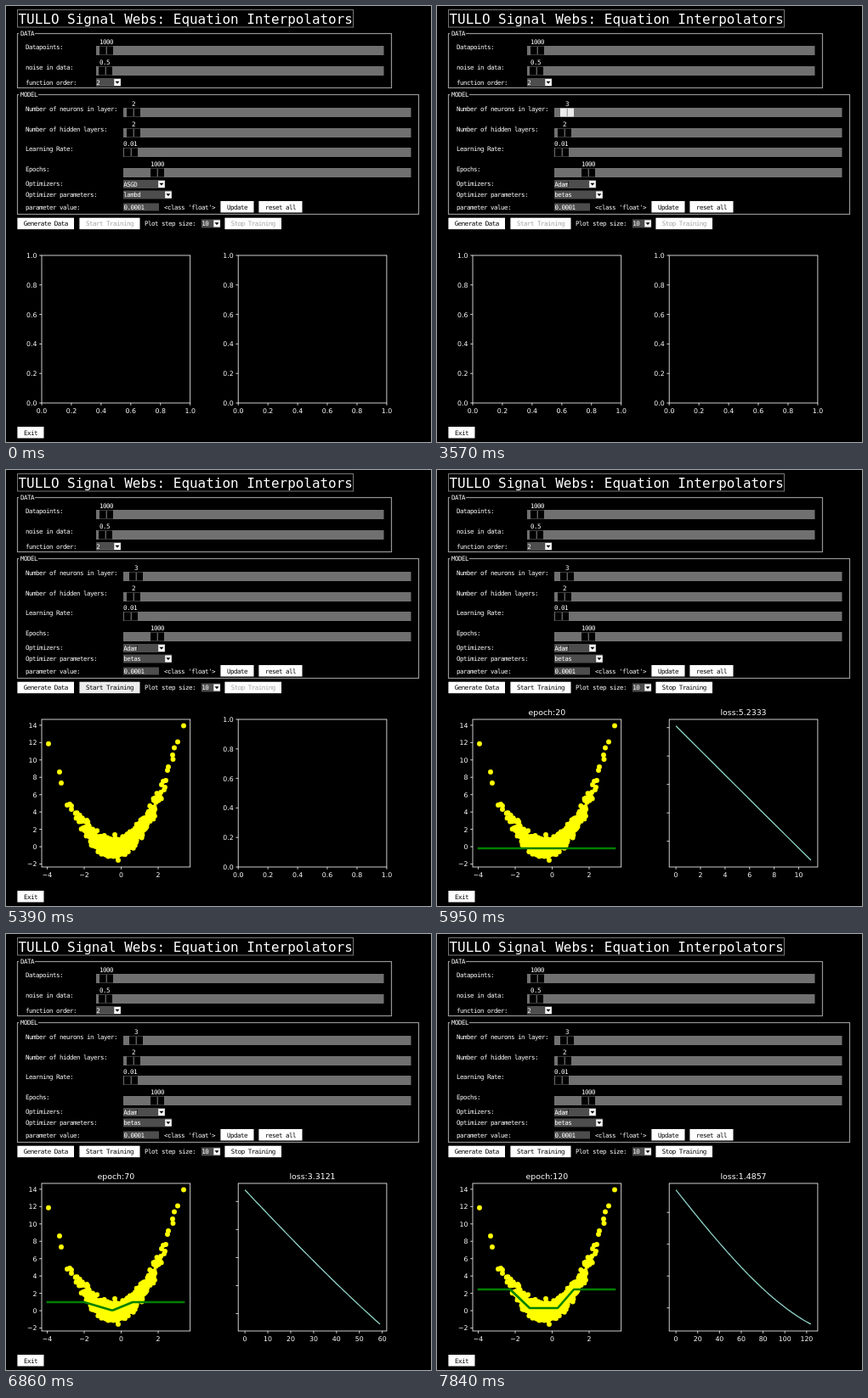
Recreate the animation shown at these times as an HTML page. Size 500x514 px, loop 8 s.

```html
<!DOCTYPE html>
<html lang="en">
<head>
<meta charset="utf-8">
<title>Function fitting demo</title>
<style>
  html, body { margin: 0; width: 100%; height: 100%; overflow: hidden; background: #000; }
  svg { display: block; width: 500px; height: 514px; }
  text { fill: #fff; white-space: pre; }
  .ui { font: 7.5px "DejaVu Sans Mono", "Noto Sans Mono", monospace; letter-spacing: -0.52px; }
  .heading { font: 15.95px "DejaVu Sans Mono", "Noto Sans Mono", monospace; }
  .tick { font: 7.8px "DejaVu Sans", sans-serif; }
  .title { font: 9.4px "DejaVu Sans", sans-serif; }
</style>
</head>
<body>
<svg id="stage" viewBox="0 0 500 514" xmlns="http://www.w3.org/2000/svg"></svg>
<script>
const LOOP = 8000;
const INPUT = '#4d4d4d', TROUGH = '#707070', ACTIVE = '#ececec', DISABLED = '#a3a3a3';
const stage = document.getElementById('stage');

function add(tag, attrs, parent = stage, content) {
  const el = document.createElementNS('http://www.w3.org/2000/svg', tag);
  for (const key in attrs) el.setAttribute(key, attrs[key]);
  if (content !== undefined) el.textContent = content;
  parent.appendChild(el);
  return el;
}
const rect = (x, y, width, height, fill, extra = {}, parent) =>
  add('rect', { x, y, width, height, fill, ...extra }, parent);
const label = (x, y, content, cls = 'ui', anchor = 'start', parent) =>
  add('text', { x, y, class: cls, 'text-anchor': anchor }, parent, content);
const set = (el, key, value) => {
  if (el.getAttribute(key) !== String(value)) el.setAttribute(key, value);
};
const setText = (el, value) => { if (el.textContent !== value) el.textContent = value; };
const show = (el, on) => set(el, 'visibility', on ? 'visible' : 'hidden');

// ---- Widgets ----
function groupBox(x, y, w, h, name) {
  rect(x + .5, y + .5, w, h, 'none', { stroke: '#959595', 'stroke-width': 1.2 });
  rect(x + 2, y - 3, name.length * 4 + 3, 7, '#000');
  label(x + 4, y + 3, name);
}

function slider(x, y, name, nameX, value, center, textX = center) {
  label(nameX, y + 4, name);
  rect(x, y, 338.5, 11, TROUGH);
  const knob = add('g', {});
  const face = rect(-8, y + .5, 16, 10, '#000', {}, knob);
  rect(-.3, y + 1, 1, 9, '#8a8a8a', {}, knob);
  const text = label(textX, y - 1.6, value, 'ui', 'middle');
  const move = cx => set(knob, 'transform', `translate(${cx} 0)`);
  move(center);
  return { face, text, move };
}

function combo(x, y, w, value) {
  rect(x, y, w, 10, INPUT);
  const button = rect(x + w - 8, y + 1, 7.5, 8, '#fff');
  add('path', { d: `M${x + w - 6.8} ${y + 3.8}h5l-2.5 3z`, fill: '#000' });
  return { button, text: label(x + .2, y + 7.6, value) };
}

function button(x, y, w, name) {
  const face = rect(x + .4, y, w - .9, 13.5, '#fff');
  const text = label(x + w / 2, y + 9.6, name, 'ui', 'middle');
  text.style.fill = '#000';
  return { face, text };
}
const enable = (b, on) => { b.text.style.fill = on ? '#000' : DISABLED; };

rect(0, 0, 500, 514, '#000');
rect(13.5, 4.5, 395, 20.5, 'none', { stroke: '#777', 'stroke-width': 1 });
label(14.5, 20.5, 'TULLO Signal Webs: Equation Interpolators', 'heading');

groupBox(13, 32, 440, 64, 'DATA');
slider(106, 47, 'Datapoints:', 23, '1000', 118);
slider(106, 71, 'noise in data:', 23, '0.5', 117, 116);
label(23, 92.6, 'function order:');
combo(106, 85, 29.3, '2');

groupBox(13, 104, 472, 141, 'MODEL');
const neurons = slider(138, 120, 'Number of neurons in layer:', 23, '2', 150);
slider(138, 144, 'Number of hidden layers:', 23, '2', 150);
slider(138, 167, 'Learning Rate:', 23, '0.01', 147, 146);
slider(138, 191, 'Epochs:', 23, '1000', 178);
label(23, 212.4, 'Optimizers:');
const optimizer = combo(138, 205, 49.2, 'ASGD');
const cursor = rect(154.2, 207, .7, 6, '#000');
label(23, 224.6, 'Optimizer parameters:');
const parameter = combo(138, 217.5, 57.2, 'lambd');
label(23, 239.6, 'parameter value:');
rect(138, 232.5, 42, 9, INPUT);
label(138.5, 239.6, '0.0001');
label(186, 239.6, "<class 'float'>");
button(252, 230, 40, 'Update');
button(297, 230, 52, 'reset all');

const generate = button(13, 249.7, 67.5, 'Generate Data');
const start = button(86, 249.7, 72, 'Start Training');
label(163, 259.2, 'Plot step size:');
combo(230, 251.5, 22.3, '10');
const stop = button(257, 249.7, 67.5, 'Stop Training');
button(13, 496, 32, 'Exit');

// ---- Plots ----
const TOP = 294, BOTTOM = 468, SIZE = 174.7;
const range = (from, to, step) => {
  const out = [];
  for (let i = Math.ceil(from / step - 1e-9); i * step <= to + 1e-9; i++) out.push(i * step);
  return out;
};
const minus = v => String(v).replace('-', '\u2212');

function axes(left) {
  const group = add('g', {});
  const ticks = add('g', {}, group);
  rect(left, TOP, SIZE, BOTTOM - TOP, 'none', { stroke: '#fff', 'stroke-width': .8 }, group);
  const title = label(left + SIZE / 2, 289.3, '', 'title', 'middle', group);
  let current = '';
  const draw = (key, xs, ys, px, py, format, yLabels = true) => {
    if (key === current) return;
    current = key;
    ticks.replaceChildren();
    let d = '';
    for (const v of xs) {
      d += `M${px(v)} ${BOTTOM}v2.8`;
      label(px(v), 479.8, format(v), 'tick', 'middle', ticks);
    }
    for (const v of ys) {
      d += `M${left} ${py(v)}h-2.8`;
      if (yLabels) label(left - 5.5, py(v) + 2.9, format(v), 'tick', 'end', ticks);
    }
    add('path', { d, stroke: '#fff', 'stroke-width': .8 }, ticks);
  };
  const unit = range(0, 1, .2);
  const drawEmpty = () => draw('empty', unit, unit,
    v => left + v * SIZE, v => BOTTOM - v * (BOTTOM - TOP), v => v.toFixed(1));
  return { title, draw, drawEmpty };
}
const fitAxes = axes(42), lossAxes = axes(273.2);

const dataX = v => 135.5 + v * 21.75;
const dataY = v => 444.1 - v * 10.23;

function scatterPath() {
  let seed = 7;
  const random = () => (seed = seed * 16807 % 2147483647) / 2147483647;
  const normal = () => Math.sqrt(-2 * Math.log(random())) * Math.cos(2 * Math.PI * random());
  const dot = (x, y) => `M${x.toFixed(1)} ${y.toFixed(1)}h0`;
  const stray = [[50, 322.7], [63, 356], [65, 369], [72, 395], [75, 394], [77, 396], [77, 400],
    [209, 301.5], [202, 320.5], [198, 327.5], [196, 336], [196.5, 341], [191, 350], [190, 354],
    [188, 366], [185, 367], [183, 371], [187, 374], [186, 377], [132, 460], [128, 430]];
  let d = stray.map(p => dot(...p)).join('');
  for (let i = 0; i < 980;) {
    const x = normal(), noise = normal() * .5;
    if (x < -2.5 || x > 2.2 || Math.abs(noise) > 1.2) continue;
    d += dot(dataX(x), dataY(.96 * x * x + .8 * x + .1 + noise));
    i++;
  }
  return d;
}
const scatter = add('path', { d: scatterPath(), stroke: '#ff0', 'stroke-width': 5.9,
  'stroke-linecap': 'round', fill: 'none' });
const fit = add('path', { stroke: '#008000', 'stroke-width': 2.6, fill: 'none',
  'stroke-linejoin': 'round', 'stroke-linecap': 'square' });
const lossLine = add('path', { stroke: '#8dd3c7', 'stroke-width': 1.3, fill: 'none' });

// Knots of the fitted curve: top level, bottom level, then four corner x positions.
const FITS = [[20, 446, 446, 92, 124, 126, 149], [70, 434, 443.5, 92, 124, 126, 149],
  [120, 419, 441, 86, 109, 142, 161]];
function fitPath(epoch) {
  const [a, b] = epoch < 70 ? [FITS[0], FITS[1]] : [FITS[1], FITS[2]];
  const k = Math.max(0, (epoch - a[0]) / 50);
  const [, top, low, x1, x2, x3, x4] = a.map((v, i) => v + (b[i] - v) * k);
  const drop = Math.max(0, 20 - epoch) * .12;
  return `M49 ${top + drop}H${x1}L${x2} ${low + drop}H${x3}L${x4} ${top + drop}H209`;
}

// Cubic in Newton form: nearly straight at first, then flattening.
const loss = n => 5.2333 + (n - 11) * (-.040025 + (n - 59) * (.00010555 + (n - 124) * 4.486e-7));

function niceStep(span, bins) {
  const base = 10 ** Math.floor(Math.log10(span / bins));
  return [1, 2, 2.5, 5, 10].map(m => m * base).find(s => span / s <= bins);
}

function drawLoss(n) {
  if (!n) return lossAxes.drawEmpty();
  const high = loss(0), low = loss(n);
  const px = v => 281.1 + v / n * 158.9;
  const py = v => 301.7 + (high - v) / (high - low) * 158.3;
  const padX = n * .05, padY = (high - low) * .05;
  lossAxes.draw('loss' + n,
    range(-padX, n + padX, niceStep(n * 1.1, 7)),
    range(low - padY, high + padY, niceStep((high - low) * 1.1, 9)),
    px, py, v => String(+v.toFixed(2)), false);
  let d = '';
  for (let i = 0; i <= n; i++) d += `${i ? 'L' : 'M'}${px(i).toFixed(2)} ${py(loss(i)).toFixed(2)}`;
  set(lossLine, 'd', d);
}

// ---- Timeline ----
// time, epoch on the left plot, loss samples on the right plot
const TRAINING = [[5670, 0, 0], [5740, 10, 0], [5810, 10, 11], [5950, 20, 11], [6020, 20, 21],
  [6160, 30, 21], [6230, 30, 32], [6370, 40, 32], [6440, 40, 42], [6650, 50, 42], [6720, 50, 51],
  [6790, 60, 59], [6860, 70, 59], [6930, 70, 70], [7070, 80, 70], [7140, 80, 82], [7350, 90, 82],
  [7420, 90, 92], [7560, 100, 92], [7630, 100, 104], [7700, 110, 114], [7840, 120, 124]];
const BLINKS = [2030, 2660, 3010, 3640, 3920, 4550, 4900, 5530, 5810, 6440, 6720, 7350, 7630];

function render(t) {
  const within = (from, to) => t >= from && t < to;
  const face = (el, active, idle = '#fff') => set(el, 'fill', active ? ACTIVE : idle);

  face(parameter.button, within(350, 420));
  face(optimizer.button, within(560, 840));
  setText(optimizer.text, t < 2030 ? 'ASGD' : 'Adam');
  setText(parameter.text, t < 2030 ? 'lambd' : 'betas');
  show(cursor, BLINKS.filter(b => t >= b).length % 2);

  const center = t < 3570 ? 150 : 153;
  neurons.move(center);
  set(neurons.text, 'x', center);
  setText(neurons.text, t < 3570 ? '2' : '3');
  face(neurons.face, within(2660, 3850), '#000');

  face(generate.face, within(4480, 4760));
  face(start.face, within(5390, 5810));
  enable(start, t >= 4690);
  enable(stop, t >= 5530);

  const hasData = t >= 4690;
  show(scatter, hasData);
  if (hasData) fitAxes.draw('data', range(-4, 2, 2), range(-2, 14, 2), dataX, dataY, minus);
  else fitAxes.drawEmpty();

  const step = TRAINING.filter(s => t >= s[0]).pop();
  const epoch = step ? step[1] : 0, samples = step ? step[2] : 0;
  show(fit, step);
  show(lossLine, samples);
  if (step) set(fit, 'd', fitPath(epoch));
  drawLoss(samples);
  setText(fitAxes.title, step ? 'epoch:' + epoch : '');
  setText(lossAxes.title, samples ? 'loss:' + loss(samples).toFixed(4) : '');
}

const origin = performance.now();
function tick() {
  render((performance.now() - origin) % LOOP);
  requestAnimationFrame(tick);
}
render(0);
requestAnimationFrame(tick);
</script>
</body>
</html>
```
